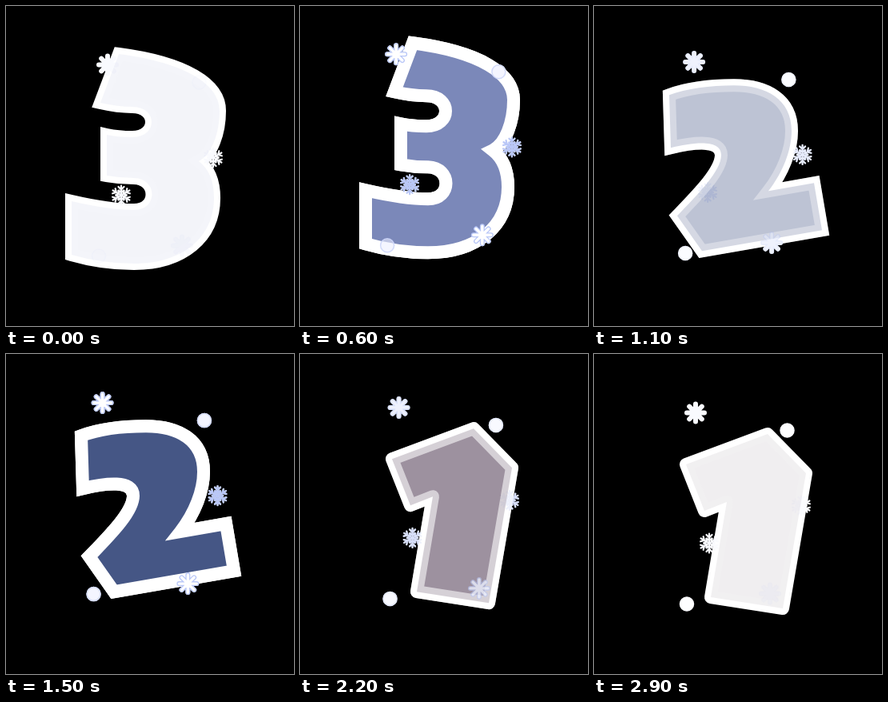
An HTML page with a canvas that plays this animation: 360 px wide and 400 px high, repeating every 3 s.

```html
<!DOCTYPE html>
<html lang="en">
<head>
<meta charset="utf-8">
<title>Snowy countdown</title>
<style>
  html, body { margin: 0; width: 100%; height: 100%; overflow: hidden; background: #000; }
  canvas { display: block; }
</style>
</head>
<body>
<canvas id="stage" width="360" height="400"></canvas>
<script>
const ctx = document.getElementById('stage').getContext('2d');
const WHITE = '#fff', ICE = '#b9c7f7';
const STEP = 100, STEPS = 10, RISE = 14;

const digits = [
  { color: '#7b88b9', join: 'miter', path: new Path2D(
    'M141 46L118 107Q140 112 158 112C190 112 190 150 158 150Q140 150 126 147V198' +
    'Q143 201 160 201C190 202 190 241 160 241Q130 241 82 230V297Q120 308 160 308' +
    'C221 308 260 275 260 226C260 205 254 190 241 180C257 172 267 145 267 117' +
    'C267 84 225 57 141 46Z') },
  { color: '#455685', join: 'miter', path: new Path2D(
    'M94 101L96 167C125 160 159 156 159 176C159 196 130 225 104 252L135 296L285 270' +
    'L275 211L218 221C236 198 247 170 247 146C247 106 215 89 175 89C145 89 115 93 94 101Z') },
  { color: '#564059', join: 'round', path: new Path2D(
    'M115 124L217 86L265 135L236 304L146 290L166 171L138 182Z') }
];

// Repeats one arm, pointing up, around the centre.
function star(arm, count) {
  const path = new Path2D(), base = new Path2D(arm);
  for (let i = 0; i < count; i++) path.addPath(base, new DOMMatrix().rotate(i * 360 / count));
  return path;
}
const sparkle = star('M0 0V-11', 8);
const crystal = star('M0 0V-12M-3.5 -10.5L0 -7L3.5 -10.5M-3 -6L0 -3L3 -6', 6);
const ball = new Path2D();
ball.arc(0, 0, 8.5, 0, Math.PI * 2);

// drift: horizontal distance covered while rising
const crystals = [
  { x: 137, y: 223, drift: -7, draw: drawCrystal },
  { x: 265, y: 176, drift: 6, draw: drawCrystal }
];
const ornaments = [
  { x: 120, y: 60, drift: -7, draw: drawSparkle },
  { x: 228, y: 286, drift: 8, draw: drawSparkle },
  { x: 248.5, y: 82, drift: 7, draw: drawBall },
  { x: 109, y: 299, drift: -7, draw: drawBall }
];

function stroke(path, color, width) {
  ctx.strokeStyle = color;
  ctx.lineWidth = width;
  ctx.stroke(path);
}

function fill(path, color) {
  ctx.fillStyle = color;
  ctx.fill(path);
}

function drawCrystal(mask) {
  stroke(crystal, mask ? WHITE : ICE, 2.2);
}

function drawSparkle(mask) {
  stroke(sparkle, mask ? WHITE : ICE, 6);
  stroke(sparkle, WHITE, 3.4);
}

function drawBall(mask) {
  fill(ball, mask ? WHITE : 'rgba(236,239,255,.6)');
  stroke(ball, mask ? WHITE : 'rgba(205,214,250,.9)', 1.5);
}

function drawDigit({ path, color, join }, progress, mask) {
  ctx.save();
  ctx.translate(0, RISE * (1 - progress));
  ctx.lineJoin = join;
  fill(path, mask ? WHITE : color);
  stroke(path, WHITE, 16);
  ctx.restore();
}

function drawOrnaments(list, progress, mask) {
  for (const { x, y, drift, draw } of list) {
    ctx.save();
    ctx.translate(x - drift * (1 - progress), y + 13.5 * (1 - progress));
    ctx.lineCap = ctx.lineJoin = 'round';
    draw(mask);
    ctx.restore();
  }
}

function drawScene(index, progress, mask) {
  const digit = () => drawDigit(digits[index], progress, mask);
  const flakes = () => drawOrnaments(crystals, progress, mask);
  // The crystals sit in front of the 3 but behind the 2 and the 1.
  const order = index === 0 ? [digit, flakes] : [flakes, digit];
  order.forEach(draw => draw());
  drawOrnaments(ornaments, progress, mask);
}

function render() {
  const tick = Math.floor(performance.now() / STEP) % (STEPS * digits.length);
  const index = Math.floor(tick / STEPS), step = tick % STEPS;
  const u = step <= 7 ? step / 7 : (9 - step) / 2;
  const progress = u * (2 - u);

  ctx.globalAlpha = 1;
  fill('nonzero' && new Path2D('M0 0H360V400H0Z'), '#000');
  // An opaque white silhouette lies under the fading layers.
  drawScene(index, progress, true);
  ctx.globalAlpha = 0.09 + 0.91 * Math.min(1, progress * 1.09);
  drawScene(index, progress, false);
  requestAnimationFrame(render);
}
render();
</script>
</body>
</html>
```
